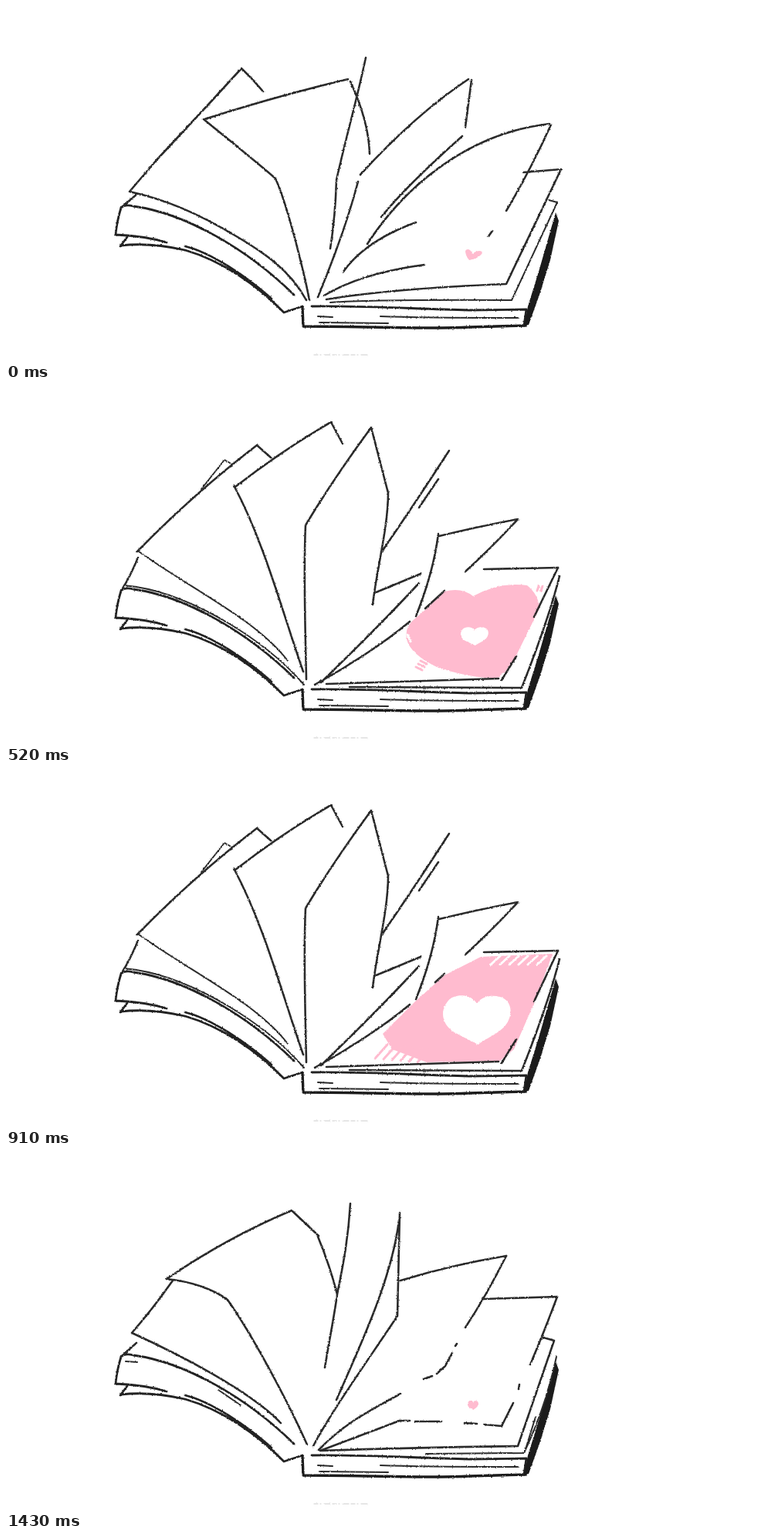
These frames come from a looping animation (1000x461 px, 1560 ms). An HTML page:

```html
<!DOCTYPE html>
<html lang="en">
<head>
<meta charset="utf-8">
<title>Book with turning pages</title>
<style>
html, body { margin: 0; width: 100%; height: 100%; overflow: hidden; background: #fff; }
svg { display: block; width: 100%; height: 100%; }
path { fill: none; stroke: #2a2a2a; stroke-width: 2.6; stroke-linecap: round; stroke-linejoin: round; }
.cover { stroke-width: 2.8; stroke: #222; }
.edge { stroke-width: 3.4; stroke: #1c1c1c; }
.thin { stroke-width: 2; }
.spine { fill: #1b1b1b; stroke: none; }
.smudge { stroke: #dedede; stroke-width: 1.3; stroke-dasharray: 5 3 1 4 8 3; }
.pink { fill: #ffbbcf; stroke: none; }
.white { fill: #fff; stroke: none; }
.pinkLine { stroke: #ffbbcf; stroke-width: 3; }
.whiteLine { stroke: #fff; stroke-width: 3; }
</style>
</head>
<body>
<svg viewBox="0 0 1000 461">
  <filter id="pencil" filterUnits="userSpaceOnUse" x="0" y="0" width="1000" height="461" color-interpolation-filters="sRGB">
    <feTurbulence type="fractalNoise" baseFrequency=".45" numOctaves="2" seed="4"/>
    <feDisplacementMap in="SourceGraphic" scale="2.4" xChannelSelector="R" yChannelSelector="G"/>
  </filter>
  <g id="scene" filter="url(#pencil)"></g>
</svg>
<script>
const STEP = 130, COUNT = 12, LOOP = STEP * COUNT;
const scene = document.getElementById('scene');

const path = (d, cls = '') => `<path class="${cls}" d="${d}"/>`;

// Heart in the box x, y, w, h
function heart(x, y, w, h, cls = 'pink') {
  const p = (a, b) => `${(x + a * w).toFixed(1)} ${(y + b * h).toFixed(1)} `;
  return path(
    `M${p(.5, .17)}C${p(.42, -.03)}${p(.17, -.05)}${p(.07, .12)}` +
    `C${p(-.06, .34)}${p(0, .62)}${p(.18, .76)}` +
    `C${p(.3, .85)}${p(.42, .93)}${p(.52, 1)}` +
    `C${p(.66, .84)}${p(.88, .76)}${p(.96, .52)}` +
    `C${p(1.04, .3)}${p(.98, .08)}${p(.84, .03)}` +
    `C${p(.7, -.02)}${p(.56, .03)}${p(.5, .17)}Z`, cls);
}

// n parallel strokes, each shifted by sx, sy
function hatch(x, y, n, sx, sy, dx, dy, cls = 'pinkLine') {
  let d = '';
  for (let i = 0; i < n; i++) d += `M${x + i * sx} ${y + i * sy}l${dx} ${dy}`;
  return path(d, cls);
}

const book =
  path('M149 262C146 272 143 285 142 297C165 298 188 301 208 307M149 262Q154 257 165 260C232 269 312 315 373 375', 'cover') +
  path('M148 312L157 300M149 311C175 308 205 311 232 317C280 331 325 362 360 398L384 390M232 312C265 320 310 350 344 380', 'cover') +
  path('M384 391L385 416C480 416 540 420 600 417L673 415', 'edge') +
  path('M396 390C470 389 520 393 600 395L674 394L671 415', 'cover') +
  path('M404 403L423 404M407 411L495 412M485 403C540 405 600 405 663 405', 'thin') +
  path('M712 268L716 279L705 330L691 375L677 414L671 416L676 390L690 345L700 310Z', 'spine') +
  path('M399 453H470', 'smudge');

const poses = {
  a: path(
    'M333 111Q320 95 305 81L262 128L195 200L160 241C205 251 245 267 300 300C335 321 368 343 389 382M149 262L170 244' +
    'M257 147Q350 117 443 95M256 147C290 175 325 203 349 224Q360 248 375 305Q388 355 393 382M446 98Q470 150 471 192' +
    'M466 67C455 120 440 172 428 226C427 260 424 290 420 315' +
    'M456 228Q440 290 404 378M459 219Q530 141 599 95M603 96L595 157M591 169Q520 232 486 274' +
    'M468 309C512 241 592 166 704 153M531 281Q465 305 437 345') +
    path('M420 385Q480 381 655 382L714 255L703 252', 'thin'),
  b: path(
    'M405 105L370 72Q285 108 208 161C240 164 270 175 287 188C320 235 365 320 390 376M404 106Q420 145 429 181' +
    'M216 163Q190 200 163 231C220 257 315 305 356 348M149 262L169 244' +
    'M446 63C443 115 435 150 429 181C425 210 418 245 413 276' +
    'M510 75L507 209C470 265 420 335 398 378M509 85C500 160 460 245 428 318' +
    'M511 163Q580 142 648 131M619 187L714 184M696 237L710 241L663 378Q520 380 407 384L510 345') +
    path('M275 305L304 325M155 268L170 269M544 388L671 387Q700 325 713 262M673 382L686 340', 'thin'),
  c: path(
    'M343 89L325 73C270 115 215 165 170 211M171 219Q160 245 151 259' +
    'M436 71L421 43Q360 78 297 127M295 125C335 200 358 290 385 367' +
    'M473 50C440 95 410 140 388 177C385 240 388 320 389 377M473 50L495 135C495 180 480 235 475 280' +
    'M574 80C545 125 515 170 487 211M560 117L535 154M537 240L477 265M408 381C440 350 500 290 535 252' +
    'M400 384C440 362 490 330 523 302M560 188C556 220 545 260 531 295M561 191Q610 179 663 169Q630 205 595 237' +
    'M619 234L715 232M638 376Q520 380 415 383M717 243C705 290 685 345 668 388L445 387') +
    path('M253 130L283 92L290 96M172 211C240 260 325 300 365 353M153 255C235 262 335 325 386 384', 'thin')
};

// Each step: page pose, coloured shapes, then line parts that break around the heart
const steps = [
  ['a', path('M604 322C602 314 595 315 595 319Q596 326 600 330Q612 328 617 321C617 316 608 318 604 322Z', 'pink'),
    'M706 154Q680 212 648 266M630 292L625 299M670 216L719 212L648 361Q500 367 415 381M412 376Q460 347 542 336'],
  ['c', heart(588, 309, 37, 25),
    'M715 232L642 378M568 262L543 285'],
  ['b', heart(573, 302, 63, 41),
    'M648 131Q615 195 569 271M714 184Q692 245 668 295M654 325L643 347M510 345L565 346M582 347L605 349M405 383C440 345 500 315 555 285'],
  ['a', heart(549, 281, 113, 77),
    'M706 154Q685 203 655 252M670 216L719 212L680 292M660 336L648 361Q500 367 415 381M412 376Q460 347 530 338'],
  ['c', path('M545 285L568 263Q590 257 605 269Q640 250 675 255Q690 267 691 285L660 348L642 374Q615 379 560 362Q524 345 519 325Q516 308 530 298Z', 'pink') +
    heart(589, 309, 36, 24, 'white') + hatch(531, 361, 3, 3, -4, 8, 4) + hatch(688, 262, 2, 5, 0, 2, -6) +
    path('M520 319l4 9M640 376l4 -6', 'whiteLine'),
    'M715 232L684 296M661 347L642 378M568 262L543 285'],
  ['b', path('M505 318L555 280L580 252L612 206Q640 190 709 190L682 260L688 285L662 375Q600 383 545 379L510 362L480 355Z', 'pink') +
    heart(583, 305, 48, 32, 'white') + hatch(488, 362, 5, 11, 1, 14, 10) + hatch(625, 218, 5, 11, 1, 16, -14, 'whiteLine'),
    'M648 131L612 202M598 222L579 254M714 184L684 261M510 345L550 346M405 383C440 345 480 330 505 314M532 298L544 290'],
  ['a', path('M468 311L503 272C525 245 550 222 580 219L719 212L677 298L648 361L612 362L610 376L585 381L535 378L543 350L500 345L458 342L460 322Z', 'pink') +
    path('M462 333Q490 306 535 294M485 336Q508 317 537 301M471 309L500 280', 'whiteLine') +
    hatch(436, 356, 3, 8, -3, 4, -9) + hatch(456, 373, 8, 10, 1, 16, -25) + hatch(612, 380, 5, 9, -1, 15, -14) +
    hatch(658, 354, 11, 4.5, -9, 13, -11) + heart(579, 301, 63, 42, 'white'),
    'M706 154Q682 204 658 247M638 279L635 284M614 313L612 315M674 216L719 212L677 298M665 325L648 361L625 362M616 362L612 363M578 365Q500 369 415 381M412 376Q460 350 502 344M519 341L536 338'],
  ['c', path('M530 298L568 264L615 240L708 236L686 296L658 360L640 375L545 377L500 360L488 340Z', 'pink') +
    heart(566, 290, 88, 64, 'white') + hatch(478, 372, 6, 11, 1, 16, -18) + hatch(628, 250, 6, 12, 0, 12, -11, 'whiteLine'),
    'M715 232L684 298M661 347L642 378M568 262L556 273'],
  ['b', path('M505 318L550 283L580 263L600 229Q645 225 693 237L697 250L684 290L688 310L663 376Q600 385 555 382L530 362L475 354Z', 'pink') +
    heart(551, 275, 120, 93, 'white') + path('M553 297L568 297L572 284L555 285Z', 'white') +
    hatch(624, 208, 6, 10, 4, 34, -20) + hatch(556, 246, 4, 6, 5, 14, -9) + hatch(515, 288, 3, 9, 0, 10, -9) +
    hatch(512, 370, 4, 10, 2, 12, -9) + hatch(522, 362, 3, 10, 0, 14, 15) +
    path('M576 342L613 339M626 338h1M583 262L605 222', 'pinkLine') + path('M577 272L587 246M688 268L683 285M655 340L646 350', 'whiteLine'),
    'M648 131L614 202M598 218L579 251M714 184L684 261M510 345L538 345M554 346h3M405 383C440 345 470 332 503 315M530 299L538 293'],
  ['a', path('M567 250L597 247L595 238Q620 234 639 240L638 246L674 245L690 236L692 244L687 256L673 249L640 250L610 260L594 253L567 254Z', 'pink') +
    path('M508 310Q516 305 521 310L516 332Q523 355 541 370L520 365L502 360L503 343L514 340Z', 'pink') +
    path('M607 227L621 228M618 220L623 221M505 310L507 318M450 368l3 -4M463 367Q462 360 466 356M473 367Q471 360 476 354M481 365L482 352L488 366L490 351L497 364L497 350', 'pinkLine') +
    path('M572 331h1M590 329h1M602 322l2 1', 'pinkLine'),
    'M706 154Q695 180 683 203M668 227L663 237M681 215L719 212L701 252M690 274L685 287M678 297L674 306M662 333L657 342M650 356L648 361L615 361M577 365L568 366M532 368Q470 373 415 381M412 376Q460 349 519 341'],
  ['c', '',
    'M715 232L696 272M688 289L683 299M668 331L642 378M568 262L556 273'],
  ['b', heart(598, 319, 14, 12),
    'M648 131Q622 183 595 224M584 245L582 248M578 257L569 274L558 284M552 287L541 291M714 184Q697 230 679 272M665 298L664 304M657 322L642 352L620 350M610 349L594 348M564 346L530 346M523 345L510 345M405 383C440 347 470 333 511 310']
];

scene.innerHTML = book + steps.map(([pose, paint, lines]) =>
  `<g opacity="0">${paint}${poses[pose]}${path(lines)}</g>`).join('');

[...scene.querySelectorAll('g')].forEach((g, i) => {
  const from = i / COUNT, to = (i + 1) / COUNT;
  const frames = [[0, 0], [from, 0], [from, 1], [to, 1], [to, 0], [1, 0]];
  // 1 ms ahead, so rounding at a step boundary never shows the step before
  g.animate(frames.map(([offset, opacity]) => ({ offset, opacity })),
    { duration: LOOP, iterations: Infinity, delay: -1 });
});
</script>
</body>
</html>
```
